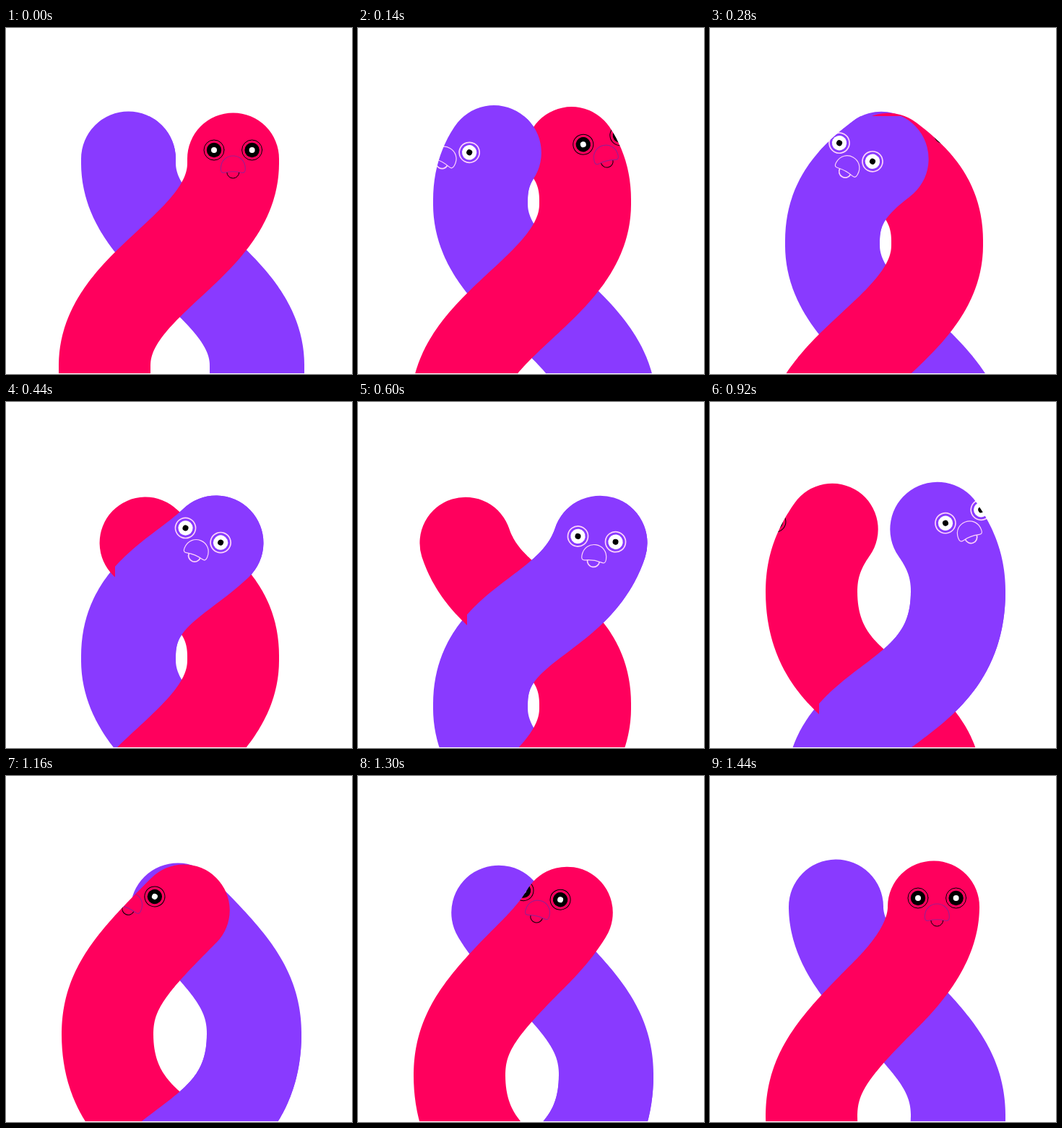
Animation of 479x479 px, one loop 1480 ms. Source, as an HTML page with a canvas:

```html
<!DOCTYPE html>
<html lang="en">
<head>
<meta charset="utf-8">
<title>Two weaving worms</title>
<style>
html, body { margin: 0; width: 100%; height: 100%; overflow: hidden; background: #fff; }
canvas { display: block; width: 479px; height: 479px; }
</style>
</head>
<body>
<canvas id="stage" width="479" height="479"></canvas>
<script>
const SIZE = 479, FLOOR = 478, LOOP = 1480, STEPS = 60, TRAVEL = 569;
const MIRROR = 484;
const ctx = document.getElementById('stage').getContext('2d');

// Centre line of the purple worm, bottom to top; the pink one is its mirror image.
const spine = [{ x: 347.5, y: 700, len: 0 }];

function lineTo(x, y) {
  const p = spine[spine.length - 1];
  spine.push({ x, y, len: p.len + Math.hypot(x - p.x, y - p.y) });
}

function curveTo(x1, y1, x2, y2, x3, y3) {
  const p = spine[spine.length - 1];
  for (let i = 1; i <= 60; i++) {
    const t = i / 60, u = 1 - t;
    const mix = (a, b, c, d) => u * u * u * a + 3 * u * u * t * b + 3 * u * t * t * c + t * t * t * d;
    lineTo(mix(p.x, x1, x2, x3), mix(p.y, y1, y2, y3));
  }
}

// S-shaped change of side with upright ends; a and b are the handle lengths.
function swayTo(x, y, a, b) {
  const p = spine[spine.length - 1];
  curveTo(p.x, p.y - a, x, y + b, x, y);
}

lineTo(347.5, 467);
swayTo(169.5, 187, 115, 115);
lineTo(169.5, 181);
const restLen = spine[spine.length - 1].len;
swayTo(343.5, -98, 132, 162);
curveTo(343.5, -160, 310, -197, 240, -267);
curveTo(203, -304, 174.5, -345, 174.5, -388);
const climb = spine[spine.length - 1].len - restLen;

function layer() {
  const c = document.createElement('canvas');
  c.width = c.height = SIZE;
  return c.getContext('2d');
}

// Face keys: step, then the point between the eyes; the face is upright at step `level`.
const purple = {
  g: layer(), flip: false, width: 131, body: '#893aff',
  line: '#ffd3fa', lineWidth: 1.7, beak: '#ffd3fa', disc: '#fff', pupil: '#000',
  level: 28.6, face: [[12, 202, 172], [18, 272.8, 184.5], [25, 330.5, 189.8], [38, 350.6, 158.5]]
};
const pink = {
  g: layer(), flip: true, width: 127, body: '#ff005d',
  line: '#000', lineWidth: 1, beak: '#a01a8c', disc: '#000', pupil: '#fff',
  level: 60, face: [[38, 68, 153], [48, 182, 156], [60, 314.3, 169], [72, 348, 135]]
};

// Smooth curve through the keys, straight beyond the ends.
function sample(keys, n, col) {
  const last = keys.length - 1;
  const slope = (i, j) => (keys[j][col] - keys[i][col]) / (keys[j][0] - keys[i][0]);
  if (n <= keys[0][0]) return keys[0][col] + slope(0, 1) * (n - keys[0][0]);
  if (n >= keys[last][0]) return keys[last][col] + slope(last - 1, last) * (n - keys[last][0]);
  let i = 0;
  while (n > keys[i + 1][0]) i++;
  const tangent = k => slope(Math.max(k - 1, 0), Math.min(k + 1, last));
  const h = keys[i + 1][0] - keys[i][0], t = (n - keys[i][0]) / h, u = 1 - t;
  return u * u * (1 + 2 * t) * keys[i][col] + t * t * (3 - 2 * t) * keys[i + 1][col]
    + h * t * u * (u * tangent(i) - t * tangent(i + 1));
}

function outline(g, color, width) {
  g.strokeStyle = color;
  g.lineWidth = width;
  g.stroke();
}

function circle(g, x, y, r) {
  g.beginPath();
  g.arc(x, y, r, 0, Math.PI * 2);
}

function disc(g, x, y, r, fill) {
  circle(g, x, y, r);
  g.fillStyle = fill;
  g.fill();
}

function drawFace(w, n) {
  const g = w.g;
  g.save();
  g.translate(sample(w.face, n, 1), sample(w.face, n, 2));
  g.rotate(Math.PI / 6 * Math.sin(0.08 * (w.level - n)));

  circle(g, 0, 30.5, 8.5);
  outline(g, w.line, w.lineWidth);

  g.beginPath();
  g.moveTo(-17, 26);
  g.bezierCurveTo(-17, 2, 17, 2, 17, 26);
  g.bezierCurveTo(17, 31, 15, 32, 11, 31);
  g.quadraticCurveTo(0, 28.5, -11, 31);
  g.bezierCurveTo(-15, 32, -17, 31, -17, 26);
  g.fillStyle = w.body;
  g.fill();
  outline(g, w.beak, 1.2);

  for (const x of [-26.3, 26.3]) {
    circle(g, x, 0, 14);
    outline(g, w.line, w.lineWidth);
    disc(g, x, 0, 10.2, w.disc);
    disc(g, x, 0, 4, w.pupil);
  }
  g.restore();
}

// The body grows along the spine at constant speed while the spine scrolls down.
function drawWorm(w, n, scroll, faceStep) {
  const g = w.g, reach = restLen + climb * n / STEPS;
  const put = (x, y) => g.lineTo(w.flip ? MIRROR - x : x, y + scroll);
  g.globalCompositeOperation = 'source-over';
  g.clearRect(0, 0, SIZE, SIZE);
  g.lineCap = g.lineJoin = 'round';
  g.beginPath();
  spine.forEach((p, i) => {
    if (p.len <= reach) return put(p.x, p.y);
    const q = spine[i - 1];
    if (q.len >= reach) return;
    const k = (reach - q.len) / (p.len - q.len);
    put(q.x + (p.x - q.x) * k, q.y + (p.y - q.y) * k);
  });
  outline(g, w.body, w.width);
  g.globalCompositeOperation = 'source-atop';
  drawFace(w, faceStep);
}

function draw(ms) {
  // Five steps in every six 20 ms slots.
  const slot = Math.floor((ms % LOOP) / 20);
  const n = Math.min(STEPS, slot - Math.floor((slot + 3) / 6));
  const scroll = n * TRAVEL / STEPS;
  drawWorm(purple, n, scroll, n);
  drawWorm(pink, n, scroll, n < STEPS / 2 ? n + STEPS : n);

  ctx.fillStyle = '#fff';
  ctx.fillRect(0, 0, SIZE, SIZE);
  ctx.save();
  ctx.beginPath();
  ctx.rect(0, 0, SIZE, FLOOR);
  ctx.clip();
  ctx.drawImage(purple.g.canvas, 0, 0);
  ctx.drawImage(pink.g.canvas, 0, 0);

  // Purple passes in front at the middle crossing only.
  const top = Math.round(Math.max(122, scroll - 100));
  ctx.beginPath();
  ctx.rect(151, top, SIZE, Math.round(scroll + 188) - top);
  ctx.clip();
  ctx.drawImage(purple.g.canvas, 0, 0);
  ctx.restore();
}

const start = performance.now();
function tick() {
  draw(performance.now() - start);
  requestAnimationFrame(tick);
}
tick();
</script>
</body>
</html>
```
